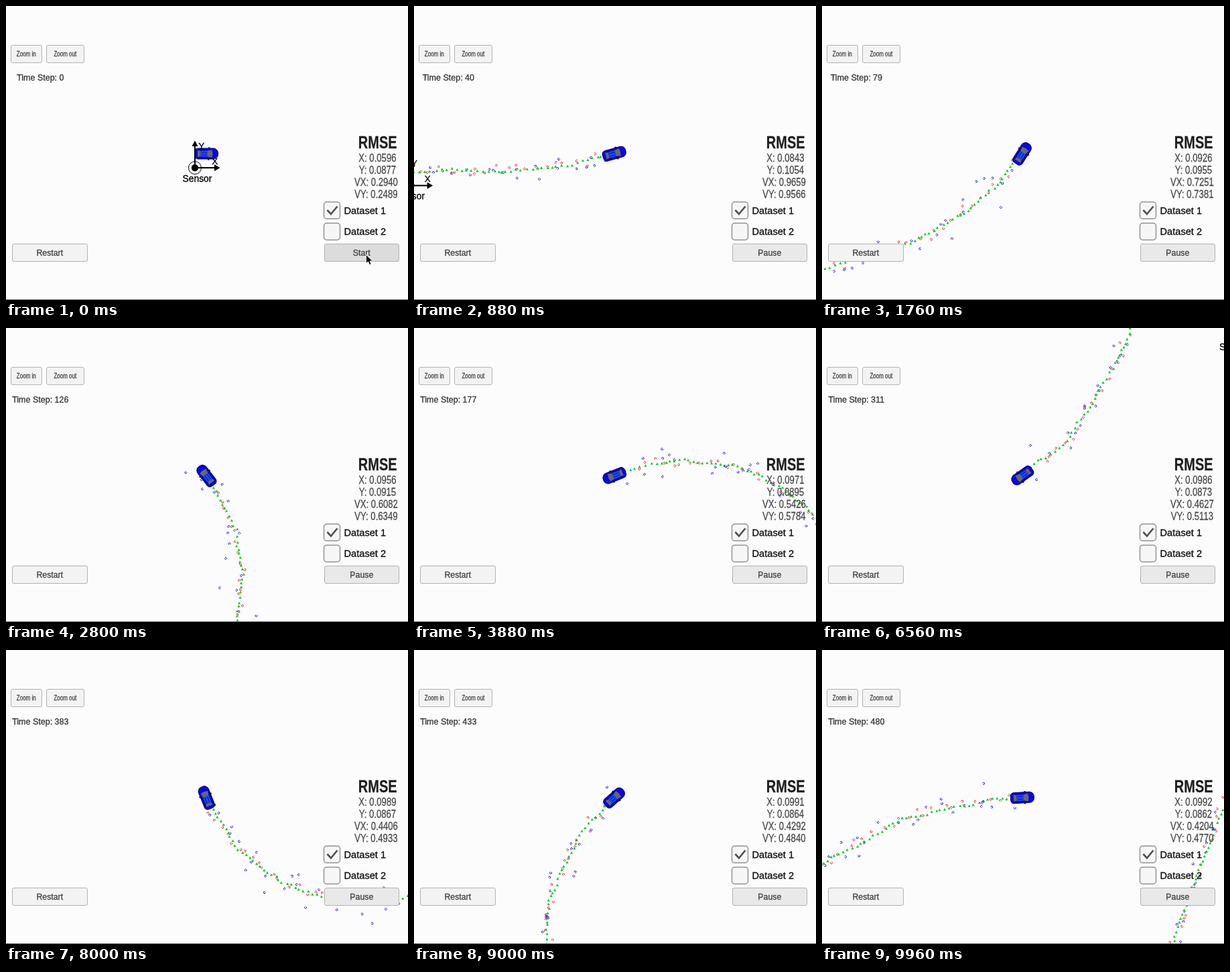
Animation, 600 px wide and 438 px high, one loop 10000 ms. Source, as an HTML page with a canvas:

```html
<!DOCTYPE html>
<html lang="en">
<head>
<meta charset="utf-8">
<title>Tracking simulator</title>
<style>
html, body { margin: 0; width: 600px; height: 438px; overflow: hidden; background: #fdfcfd; }
canvas { display: block; }
</style>
</head>
<body>
<canvas id="stage" width="600" height="438"></canvas>
<script>
const ctx = document.getElementById('stage').getContext('2d');
const LOOP = 10000, TICK = 40, LAST_STEP = 480;
const SCALE = 28.4, CAR = { x: 299, y: 220 };
const SQUASH = 0.8;   // narrow labels share one aspect
const PREVIOUS_RUN = [0.0596, 0.0877, 0.2940, 0.2489];

let seed = 11;
function random() {
  seed = seed + 0x6D2B79F5 | 0;
  let r = Math.imul(seed ^ seed >>> 15, 1 | seed);
  r = r + Math.imul(r ^ r >>> 7, 61 | r) ^ r;
  return ((r ^ r >>> 14) >>> 0) / 4294967296;
}
const gauss = () => (random() + random() + random() + random() - 2) * 1.73;

// Figure-eight drive with its laser, radar and filtered positions
function drive(count) {
  const path = [];
  let x = 0.6, y = 0.6, yaw = 0, ex = -0.288, ey = -0.02;
  for (let k = 0; k < count; k++) {
    const u = 2 * Math.PI * (k + 1) / 500, laser = k % 2 === 0;
    const range = Math.hypot(x, y) + 0.3 * gauss();
    const angle = Math.atan2(y, x) + 0.03 * gauss();
    const seen = laser
      ? { x: x + 0.14 * gauss(), y: y + 0.14 * gauss() }
      : { x: range * Math.cos(angle), y: range * Math.sin(angle) };
    path.push({ x, y, yaw, laser, seen, turn: random() * 6.28, guess: { x: x + ex, y: y + ey } });
    const v = 5 + 0.2 * Math.cos(2 * u);
    x += 0.05 * v * Math.cos(yaw);
    y += 0.05 * v * Math.sin(yaw);
    yaw += 0.05 * 0.55 * Math.sin(u);
    ex = 0.75 * ex + 0.05 * gauss();
    ey = 0.75 * ey + 0.05 * gauss();
  }
  return path;
}
const path = drive(LAST_STEP + 1);

// Slow start, then two steps per tick
const stepAt = time => Math.min(LAST_STEP, Math.round(Math.max(0.045 * time, 0.05 * time - 17)));

// Start-up error fades over the steps towards a steady level
function rmseAt(step) {
  if (!step) return PREVIOUS_RUN;
  return [
    Math.sqrt(0.0101 - 0.12 / Math.max(step, 20)),
    Math.sqrt(0.0071 + 0.16 / step),
    Math.sqrt(0.108 + 33 / step),
    Math.sqrt(0.165 + 30 / step)
  ];
}

function label(text, x, y, size, color = '#333', narrow = 1, weight = '') {
  ctx.save();
  ctx.translate(x, y);
  ctx.scale(narrow, 1);
  ctx.font = `${weight} ${size}px "Liberation Sans", Arial, sans-serif`;
  ctx.textAlign = 'center';
  ctx.fillStyle = ctx.strokeStyle = color;
  ctx.lineWidth = 0.3;
  ctx.fillText(text, 0, size * 0.36);
  ctx.strokeText(text, 0, size * 0.36);
  ctx.restore();
}

function box(x, y, w, h, fill, stroke, radius, line = 1) {
  ctx.beginPath();
  ctx.roundRect(x + 0.5, y + 0.5, w - 1, h - 1, radius);
  ctx.fillStyle = fill;
  ctx.fill();
  ctx.strokeStyle = stroke;
  ctx.lineWidth = line;
  ctx.stroke();
}

function button(text, x, y, w, size, narrow, fill = '#f3f3f3') {
  box(x, y, w, 27, fill, '#b2b2b2', 2.5);
  label(text, x + w / 2 - 0.2, y + 13.8, size, '#404040', narrow);
}

function poly(fill, ...points) {
  ctx.beginPath();
  for (let i = 0; i < points.length; i += 2) ctx.lineTo(points[i], points[i + 1]);
  ctx.closePath();
  ctx.fillStyle = fill;
  ctx.fill();
}

function line(color, width, ...points) {
  ctx.beginPath();
  for (let i = 0; i < points.length; i += 2) ctx.lineTo(points[i], points[i + 1]);
  ctx.strokeStyle = color;
  ctx.lineWidth = width;
  ctx.stroke();
}

function drawTrail(step, toScreen) {
  ctx.lineWidth = 1;
  for (const p of path.slice(0, step)) {
    const [mx, my] = toScreen(p.seen), [gx, gy] = toScreen(p.guess);
    ctx.strokeStyle = p.laser ? '#e02020' : '#1414b4';
    ctx.beginPath();
    ctx.arc(mx, my, 1.5, p.turn, p.turn + 5.4);
    ctx.stroke();
    poly('#10c828', gx - 2.1, gy + 1.7, gx + 2.1, gy + 1.7, gx, gy - 2.1);
  }
}

function drawCar(yaw) {
  ctx.save();
  ctx.translate(CAR.x, CAR.y);
  ctx.rotate(-yaw);
  poly('#000070', 3, -9.5, 5.5, -9.5, 4.5, 9.5, 2, 9.5);
  box(-18, -8.5, 36, 17, '#0808e0', '#000078', [5, 7, 7, 5]);
  line('#101040', 1, -13, -6, 7, -6.5);
  line('#101040', 1, -13, 6, 7, 6.5);
  poly('#1850ec', -8, -4.5, 2, -4.5, 2, 4.5, -8, 4.5);
  poly('#686868', 2, -4.5, 8.5, -5.8, 9.5, 0, 8.5, 5.8, 2, 4.5);
  poly('#686868', -13, -5, -8.5, -4, -8.5, 4, -13, 5);
  line('#0808b8', 1, -7, -2, 1, -2);
  line('#0808b8', 1, -7, 2, 1, 2);
  ctx.restore();
}

function drawSensor(x, y) {
  ctx.save();
  ctx.translate(x, y);
  line('#000', 2, 0, -33, 0, 0, 31, 0);
  ctx.lineWidth = 1;
  ctx.beginPath();
  ctx.arc(0, 0, 9.5, 0, 7);
  ctx.stroke();
  ctx.beginPath();
  ctx.arc(0, 0, 5.2, 0, 7);
  ctx.fill();
  poly('#000', -4.5, -32, 4.5, -32, 0, -40.5);
  poly('#000', 29, -5, 29, 5, 37.5, 0);
  ctx.beginPath();
  ctx.arc(0, 0, 5.2, 0, 7);
  ctx.fill();
  label('Y', 9.8, -33, 13.5, '#000');
  label('X', 29.7, -10, 13.5, '#000');
  label('Sensor', 3.5, 15.5, 13.8, '#000');
  ctx.restore();
}

function drawControls(step) {
  button('Zoom in', 7, 58, 47, 10, SQUASH);
  button('Zoom out', 60, 58, 57, 10, SQUASH);
  button('Restart', 9, 354, 113, 12.3, 1);
  button(step ? 'Pause' : 'Start', 475, 354, 112, 12.3, 1, step ? '#e9e9e9' : '#dcdcdc');
  label('Time Step: ' + step, 51.3, 106.7, 12.5);

  label('RMSE', 554.7, 203.3, 25, '#202020', SQUASH, 'bold');
  const names = ['X', 'Y', 'VX', 'VY'];
  rmseAt(step).forEach((value, i) =>
    label(`${names[i]}: ${value.toFixed(4)}`, 556.4 - 2 * names[i].length, 226 + 18 * i, 16.4, '#484848', SQUASH));

  for (const n of [1, 2]) {
    const y = 260 + 31.5 * n;
    box(474, y, 25, 26, '#f6f6f6', '#929292', 4, 1.5);
    label('Dataset ' + n, 535.8, y + 13, 14.6, '#111');
  }
  line('#505050', 2.6, 479.5, 304, 485, 310, 494.5, 298.5);
}

function drawCursor(x, y) {
  ctx.save();
  ctx.translate(x, y);
  poly('#000', 0, 0, 0, 13, 3, 10.3, 5.2, 15, 7.6, 14, 5.5, 9.4, 9.5, 9.4);
  ctx.strokeStyle = '#fff';
  ctx.lineWidth = 0.8;
  ctx.stroke();
  ctx.restore();
}

function draw(time) {
  const step = stepAt(time), here = path[step];
  const toScreen = p => [CAR.x + (p.x - here.x) * SCALE, CAR.y - (p.y - here.y) * SCALE];
  const [sensorX, sensorY] = toScreen({ x: 0, y: 0 });

  ctx.fillStyle = '#fdfcfd';
  ctx.fillRect(0, 0, 600, 438);
  drawTrail(step, toScreen);
  drawCar(here.yaw);
  drawSensor(sensorX, sensorY + 4);
  drawControls(step);
  if (!step) drawCursor(537.5, 370.5);
  ctx.fillStyle = '#666';
  ctx.fillRect(0, 437, 600, 1);
}

let start;
function frame(now) {
  start ??= now;
  draw(Math.floor((now - start) % LOOP / TICK) * TICK);
  requestAnimationFrame(frame);
}
requestAnimationFrame(frame);
</script>
</body>
</html>
```
